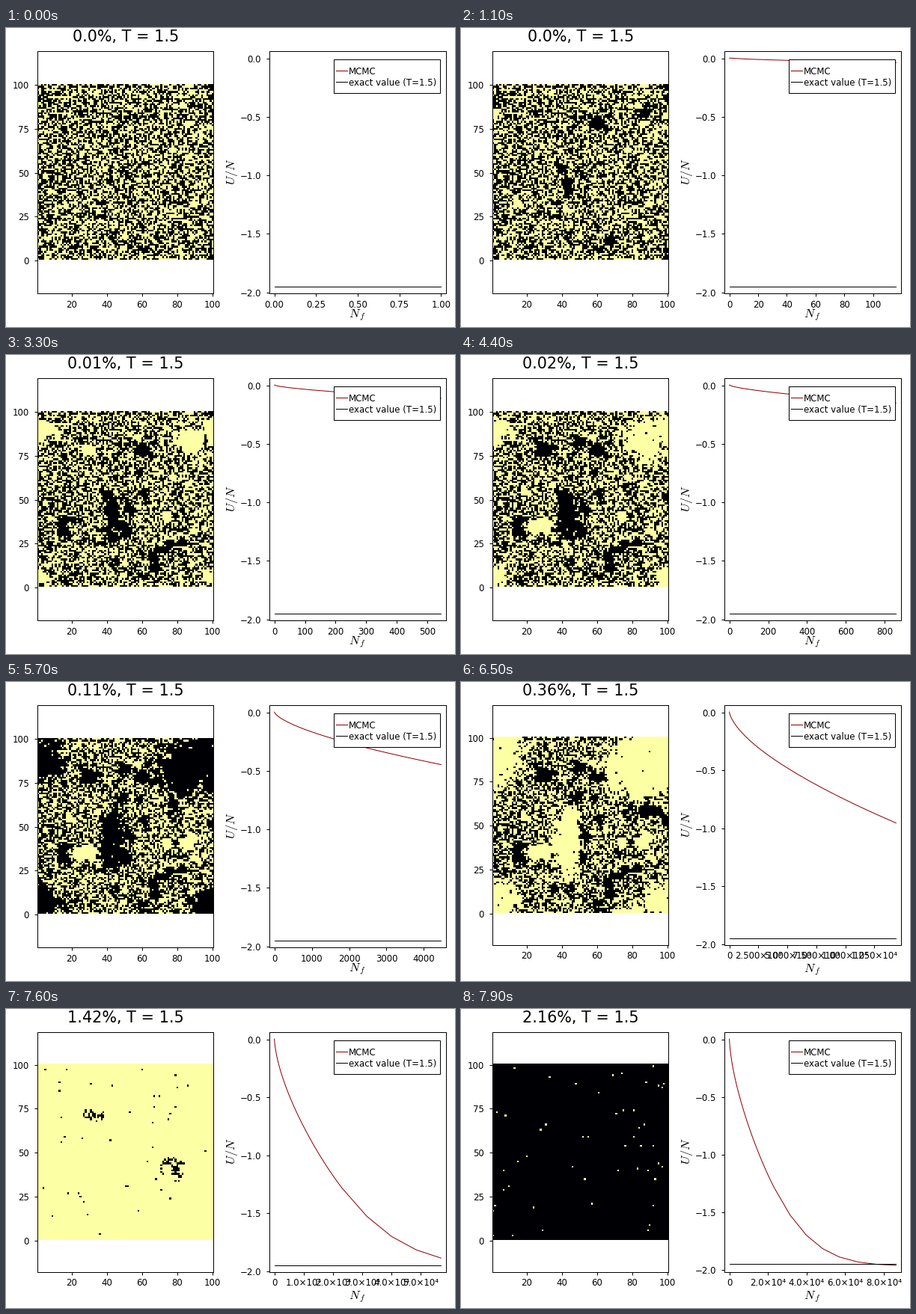
Recreate the animation shown at these times as a matplotlib script. Size 600x400 px, loop 8 s.

```python
import matplotlib.pyplot as plt
import numpy as np
from matplotlib.animation import FuncAnimation
from matplotlib.colors import ListedColormap
from matplotlib.patches import Rectangle

W, H, DPI = 600, 400, 100
FRAMES, INTERVAL = 80, 100
SIZE, FLIPS, MERGE = 100, 4_000_000, 72
EXACT, P_ADD = -1.95, 1 - np.exp(-2 / 1.5)
PX = 72 / DPI
SMALL, GUIDE, TITLE = 11.8 * PX, 16.4 * PX, 20.8 * PX
DARKRED = "#8b0000"

plt.rcParams.update({
    "font.family": "DejaVu Sans", "mathtext.fontset": "cm",
    "axes.linewidth": PX, "font.size": SMALL,
})

# Ellipses (cx, cy, rx, ry), growth time, flip period and phase
DOMAINS = [
    ([(87, 84, 20, 16), (101, 90, 13, 17), (101, 6, 13, 10)], 29, 5, 2),
    ([(43, 42, 7, 20)], 50, 6, 1),
    ([(35, 5, 2.5, 7)], np.inf, FRAMES, 10),
    ([(27, 35, 8, 5)], np.inf, FRAMES, 36),
]
# Disorder that survives until the domains merge
LEFTOVER = [(9, 46, 10, 7), (20, 56, 8, 9), (33, 72, 14, 12), (46, 94, 8, 8),
            (78, 41, 15, 14), (94, 44, 8, 8), (45, 8, 15, 8)]

rng = np.random.default_rng(15)
Y, X = np.mgrid[1:SIZE + 1, 1:SIZE + 1]
white = rng.normal(size=(SIZE, SIZE))
rough = .08 * (white + sum(np.roll(white, s, a) for s in (-1, 1) for a in (0, 1)))


def flipped_spins():
    keys = [0, 22, 44, 57, MERGE, 76, 79]
    total = [0, 232, 858, 4460, 23060, 56900, 86400]
    return np.round(np.interp(np.arange(FRAMES), keys, total)).astype(int)


def relax(n):
    """Energy per spin after n flipped spins."""
    z = n / 23000
    return .005 - 1.97 * (1 - np.exp(-.756 * z ** .68 - .3 * z ** 2))


def region(ellipses, scale=1, shrink=0):
    """Ragged periodic union of ellipses."""
    mask = np.zeros((SIZE, SIZE), bool)
    for cx, cy, rx, ry in ellipses:
        rx, ry = rx * scale - shrink, ry * scale - shrink
        if min(rx, ry) > 0:
            dx = (X - cx + 50) % SIZE - 50
            dy = (Y - cy + 50) % SIZE - 50
            mask |= np.hypot(dx / rx, dy / ry) + rough < 1
    return mask


def flip_cluster(grid, solid):
    """Grow and flip one small cluster in the disordered part."""
    free = np.argwhere(~solid)
    start = tuple(free[rng.integers(len(free))])
    spin, seen, stack = grid[start], {start}, [start]
    while stack and len(seen) < 60:
        i, j = stack.pop()
        for n in ((i + 1, j), (i - 1, j), (i, j + 1), (i, j - 1)):
            n = n[0] % SIZE, n[1] % SIZE
            if (n not in seen and not solid[n] and grid[n] == spin
                    and rng.random() < P_ADD):
                seen.add(n)
                stack.append(n)
    for cell in seen:
        grid[cell] = 1 - spin


def flip_domain(grid, mask, spin):
    """Align a domain, leaving a few thermal specks."""
    specks = rng.random(grid.shape) < .0045
    grid[mask] = np.where(specks, 1 - spin, spin)[mask]


def simulate():
    grid = rng.integers(0, 2, (SIZE, SIZE))
    solid = np.zeros((SIZE, SIZE), bool)
    rest = region(LEFTOVER)
    grids = [grid.copy()]
    for k in range(1, FRAMES):
        if k >= MERGE:
            mask = ~region(LEFTOVER, shrink=.5 * (k - MERGE) ** 2)
            flip_domain(grid, mask, (k + 1) % 2)
        else:
            flip_cluster(grid, solid)
            for ellipses, growth, period, phase in DOMAINS:
                if k % period == phase:
                    mask = region(ellipses, np.exp((k - 57) / growth)) & ~rest
                    flip_domain(grid, mask, (k // period + 1) % 2)
                    solid |= mask
        grids.append(grid.copy())
    return grids


def nice_ticks(top):
    base = 10.0 ** np.floor(np.log10(top) - 1)
    for step in (m * base * d for d in (1, 10) for m in (1, 2, 2.5, 5)):
        if top // step < 6:
            return step, np.arange(int(top // step) + 1) * step


def tick_labels(step, ticks):
    if ticks[-1] <= 10000:
        digits = 0 if step % 1 == 0 else 1 if step * 10 % 1 == 0 else 2
        return [f"{t:.{digits}f}" for t in ticks]
    digits = 1 + (step % 10000 > 0) + (step % 1000 > 0)
    power = np.floor(np.log10(ticks[1:]) + 1e-9).astype(int)
    return ["0"] + [f"{t / 10.0 ** e:.{digits}f}×10{'⁰¹²³⁴⁵'[e]}"
                    for t, e in zip(ticks[1:], power)]


def place(ax, x0, x1, y0, y1):
    ax.set_position([x0 / W, 1 - y1 / H, (x1 - x0) / W, (y1 - y0) / H])


grids = simulate()
flipped = flipped_spins()
energy = relax(flipped)

fig = plt.figure(figsize=(W / DPI, H / DPI), dpi=DPI, facecolor="white")
left, right = fig.add_axes([.1, .1, .3, .8]), fig.add_axes([.6, .1, .3, .8])
for ax in (left, right):
    ax.tick_params(length=4 * PX, width=PX, labelsize=SMALL)
    ax.tick_params(axis="x", pad=4.5 * PX)
    ax.tick_params(axis="y", pad=7 * PX)

cmap = ListedColormap(["#000004", "#fcffa4"])
image = left.imshow(grids[0], cmap=cmap, vmin=0, vmax=1, origin="lower",
                    extent=(.5, 100.5, .5, 100.5), aspect="auto",
                    interpolation="nearest")
left.set_xticks(range(20, 101, 20))
left.set_yticks(range(0, 101, 25))

mcmc, = right.plot([], [], color=DARKRED, lw=PX)
exact, = right.plot([], [], color="black", lw=PX)
levels = np.arange(0, -2.1, -.5)
right.set_yticks(levels, [f"{v:.1f}".replace("-", "−") for v in levels])

# Overlay in pixel coordinates
top = fig.add_axes([0, 0, 1, 1], zorder=5)
top.set(xlim=(0, W), ylim=(H, 0))
top.axis("off")
title = top.text(160, 18.5, "", size=TITLE, ha="center")
xlabel = top.text(470, 384, r"$N_{\,f}$", size=GUIDE, ha="center", va="center")
ylabel = top.text(301.5, 192, "$U/N$", size=GUIDE, ha="center", va="center",
                  rotation=90)
top.add_patch(Rectangle((438, 42), 142, 45, fc="white", ec="black", lw=PX))
for y, color, name in ((57, DARKRED, "MCMC"),
                       (72, "black", "exact value (T=1.5)")):
    top.plot([441, 456], [y, y], color=color, lw=PX)
    top.text(458, y + 4.5, name, size=SMALL)


def update(k):
    end = max(flipped[k], 1)
    step, ticks = nice_ticks(end) if k else (.25, np.linspace(0, 1, 5))
    lift = 3 if ticks[-1] > 10000 else 0
    y0, y1 = 31, 355 - lift
    place(left, 42, 277, y0, y1)
    place(right, 352, 588, y0, y1)

    image.set_data(grids[k])
    half = (y1 - y0) / 2 / 2.35
    left.set_xlim(.5, 100.5)
    left.set_ylim(50.3 - half, 50.3 + half)

    mcmc.set_data(flipped[:k + 1], energy[:k + 1])
    exact.set_data([0, end], [EXACT, EXACT])
    right.set_xticks(ticks, tick_labels(step, ticks))
    right.set_xlim(-.03 * end, 1.03 * end)
    low, high = min(EXACT, energy[k]), energy[0]
    pad = .03 * (high - low)
    right.set_ylim(low - pad, high + pad)

    title.set_text(f"{round(100 * flipped[k] / FLIPS, 2)}%, T = 1.5")
    xlabel.set_y(384 + lift / 2)
    ylabel.set_y(192 - lift / 2)


anim = FuncAnimation(fig, update, frames=FRAMES, interval=INTERVAL,
                     repeat=True, repeat_delay=0, blit=False)
plt.show()
```
